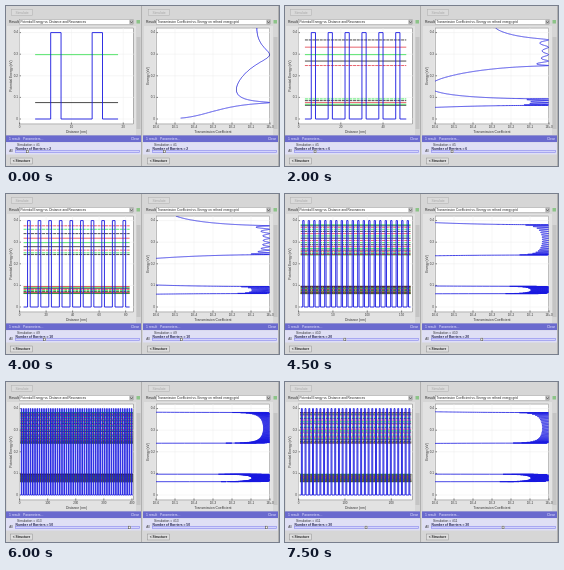
Animation of 273 by 160 pixels, one loop 8000 ms. Source, as an HTML page with a canvas:

```html
<!DOCTYPE html>
<html lang="en">
<head>
<meta charset="utf-8">
<title>Resonant tunnelling</title>
<style>
html, body { margin: 0; width: 100%; height: 100%; overflow: hidden; background: #d5d5d5; }
canvas { display: block; width: 273px; height: 160px; }
</style>
</head>
<body>
<canvas id="stage" width="273" height="160"></canvas>
<script>
const ctx = document.getElementById('stage').getContext('2d');
const BLUE = '#1a1ae0', LOOP = 8000;
// [start in ms, barriers, run number]
const STEPS = [
  [0, 2, 1], [500, 3, 2], [1000, 4, 3], [1500, 5, 4], [2000, 6, 5],
  [2500, 7, 6], [3000, 8, 7], [3500, 9, 8], [4000, 10, 9], [4500, 20, 10],
  [5000, 30, 11], [5500, 40, 12], [6000, 50, 13], [7000, 40, 12], [7500, 30, 11]
];

// Lattice: barrier height in eV, widths in nm, hbar^2 / 2m in eV nm^2
const V = 0.4, WALL = 2, WELL = 6, HB = 0.5687;
const yOf = e => 113 - e * 216;

// Bloch phase cosine and reflection factor of one period, below or above the wall
function cell(e) {
  const k = Math.sqrt(e / HB), q2 = (V - e) / HB, q = Math.sqrt(Math.abs(q2)) + 1e-9;
  const c = q2 > 0 ? Math.cosh(q * WALL) : Math.cos(q * WALL);
  const s = (q2 > 0 ? Math.sinh(q * WALL) : Math.sin(q * WALL)) / q;
  return {
    d: Math.cos(k * WELL) * c + (q2 - k * k) / (2 * k) * Math.sin(k * WELL) * s,
    f: ((k * k + q2) / (2 * k) * s) ** 2
  };
}

function logT(e, n) {
  const { d, f } = cell(e), a = Math.abs(d);
  const u = a < 1 ? Math.sin(n * Math.acos(d)) / Math.sqrt(1 - d * d)
                  : Math.sinh(n * Math.acosh(a)) / Math.sqrt(a * a - 1 + 1e-12);
  return -Math.log10(1 + u * u * f);
}

function solve(target, lo, hi) {
  const rising = cell(hi).d > cell(lo).d;
  for (let i = 0; i < 30; i++) {
    const mid = (lo + hi) / 2;
    if ((cell(mid).d < target) === rising) lo = mid; else hi = mid;
  }
  return lo;
}

function levels(n) {
  const out = [];
  for (let j = 1; j < n; j++) {
    const c = Math.cos(Math.PI * j / n);
    out.push(solve(c, 0.05, 0.12), solve(-c, 0.2, 0.395));
  }
  return out.sort((a, b) => a - b);
}

function box(x, y, w, h, fill, edge) {
  ctx.fillStyle = fill;
  ctx.fillRect(x, y, w, h);
  if (!edge) return;
  ctx.strokeStyle = edge;
  ctx.lineWidth = 0.6;
  ctx.strokeRect(x + 0.5, y + 0.5, w - 1, h - 1);
}

function line(points, color, width) {
  ctx.beginPath();
  points.forEach(([x, y]) => ctx.lineTo(x, y));
  ctx.strokeStyle = color;
  ctx.lineWidth = width;
  ctx.stroke();
}

function text(s, x, y, size = 3.3, color = '#333', align = 'left', weight = '') {
  ctx.font = `${weight} ${size}px "Liberation Sans", Arial, sans-serif`;
  ctx.textAlign = align;
  ctx.textBaseline = 'middle';
  ctx.fillStyle = color;
  ctx.fillText(s, x, y);
}

function upText(s, x, y) {
  ctx.save();
  ctx.translate(x, y);
  ctx.rotate(-Math.PI / 2);
  text(s, 0, 0, 3.3, '#333', 'center');
  ctx.restore();
}

function panel(x, title, n, run) {
  ctx.save();
  ctx.translate(x, 0);
  box(0, 0, 136, 160, '#d6d6d6');
  box(5, 3, 22, 7, '#dadada', '#b4b4b4');
  text('Simulate', 16, 6.7, 3.4, '#a6a6a6', 'center');
  text('Result:', 3, 15.8, 3.4, '#222');
  box(13, 13, 115, 6, '#fff', '#999');
  text(title, 14.5, 16, 3.15, '#222');
  box(123.5, 13.5, 4, 5, '#ccc', '#999');
  line([[124.3, 15.3], [125.5, 17], [126.7, 15.3]], '#333', 0.6);
  box(130.5, 14, 3.5, 3.5, '#8cc488');
  box(1, 20, 129, 109, '#e2e2e2');
  box(130.5, 31, 4, 92, '#c4c4c4');

  box(0, 129.4, 135, 6.8, '#6a6ace');
  text('1 result', 3, 133, 3.4, '#e8e8ff');
  text('Parameters...', 17, 133, 3.4, '#e8e8ff');
  text('Clear', 133, 133, 3.4, '#e8e8ff', 'right');
  box(0, 136.2, 135, 12.3, '#dfdff5');
  text('Simulation = #' + run, 11, 139.2, 3.3, '#333');
  text('Number of Barriers = ' + n, 9.5, 142.6, 3.3, '#22224e', 'left', 'bold');
  text('All', 5, 145, 3, '#333', 'center');
  box(9, 143.9, 125, 3, '#d4d4fb', '#8c8cec');
  box(17.3 + n * 2.125 - 1.5, 143.7, 3, 3.5, '#f5f5f5', '#555');
  box(4, 151.5, 23, 7, '#dedede', '#999');
  text('< Structure', 15.5, 155.2, 3.3, '#222', 'center', 'bold');
  box(135, 0, 1, 160, '#b0b0b0');
  ctx.restore();
}

function axes(x, w, energy, bottom) {
  box(x, 21.5, w, 97, '#fff', '#777');
  for (let i = 0; i < 5; i++) {
    const y = yOf(i / 10);
    line([[x, y], [x + w, y]], '#ededed', 0.5);
    line([[x, y], [x + 2, y]], '#333', 0.6);
    text(i ? (i / 10).toFixed(1) : '0', x - 1, y, 3, '#333', 'right');
  }
  upText(energy, x - 7.5, 70);
  text(bottom, x + w / 2, 126.5, 3.4, '#333', 'center');
}

function tick(x, label) {
  line([[x, 22], [x, 118]], '#efefef', 0.5);
  line([[x, 116.5], [x, 118.5]], '#333', 0.6);
  text(label, x, 121.3, 3, '#333', 'center');
}

function potential(n) {
  axes(13, 115, 'Potential Energy (eV)', 'Distance (nm)');
  const span = 8 * n + 6, px = nm => 13.6 + nm * 114 / span;
  const gap = n < 4 ? 10 : n < 15 ? 20 : n < 25 ? 50 : 100;
  for (let d = 0; d <= span; d += gap) tick(px(d), String(d));

  const left = px(3), right = px(span - 3);
  const colors = ['#111', '#1cdc3c', '#e0303c'];
  levels(n).forEach((e, i) => {
    ctx.setLineDash(i % 6 > 2 && n > 3 ? [3, 0.7] : []);
    line([[left, yOf(e)], [right, yOf(e)]], colors[i % 3], 0.75);
  });
  ctx.setLineDash([]);

  const pts = [[left, yOf(0)]];
  for (let i = 0; i < n; i++) {
    const a = px(6 + i * (WALL + WELL)), b = px(6 + i * (WALL + WELL) + WALL);
    pts.push([a, yOf(0)], [a, yOf(V)], [b, yOf(V)], [b, yOf(0)]);
  }
  pts.push([right, yOf(0)]);
  line(pts, BLUE, 0.9);
}

function transmission(n) {
  axes(150, 114, 'Energy (eV)', 'Transmission Coefficient');
  for (let i = 0; i <= 6; i++) tick(150 + i * 19, i < 6 ? '1E-' + (6 - i) : '1E+0');
  ctx.save();
  ctx.beginPath();
  ctx.rect(150, 22, 114.5, 96);
  ctx.clip();
  const pts = [];
  for (let e = 0.004; e < 0.421; e += 0.00008) {
    pts.push([Math.max(120, 263.5 + 19 * logT(e, n)), yOf(e)]);
  }
  ctx.lineJoin = 'round';
  line(pts, BLUE, 0.8);
  ctx.restore();
}

function draw([, n, run]) {
  panel(0, 'Potential Energy vs. Distance and Resonances', n, run);
  panel(137, 'Transmission Coefficient vs. Energy on refined energy grid', n, run);
  potential(n);
  transmission(n);
}

let shown = null;
function frame() {
  const t = performance.now() % LOOP;
  const step = STEPS.findLast(s => s[0] <= t);
  if (step !== shown) draw(shown = step);
  requestAnimationFrame(frame);
}
frame();
</script>
</body>
</html>
```
